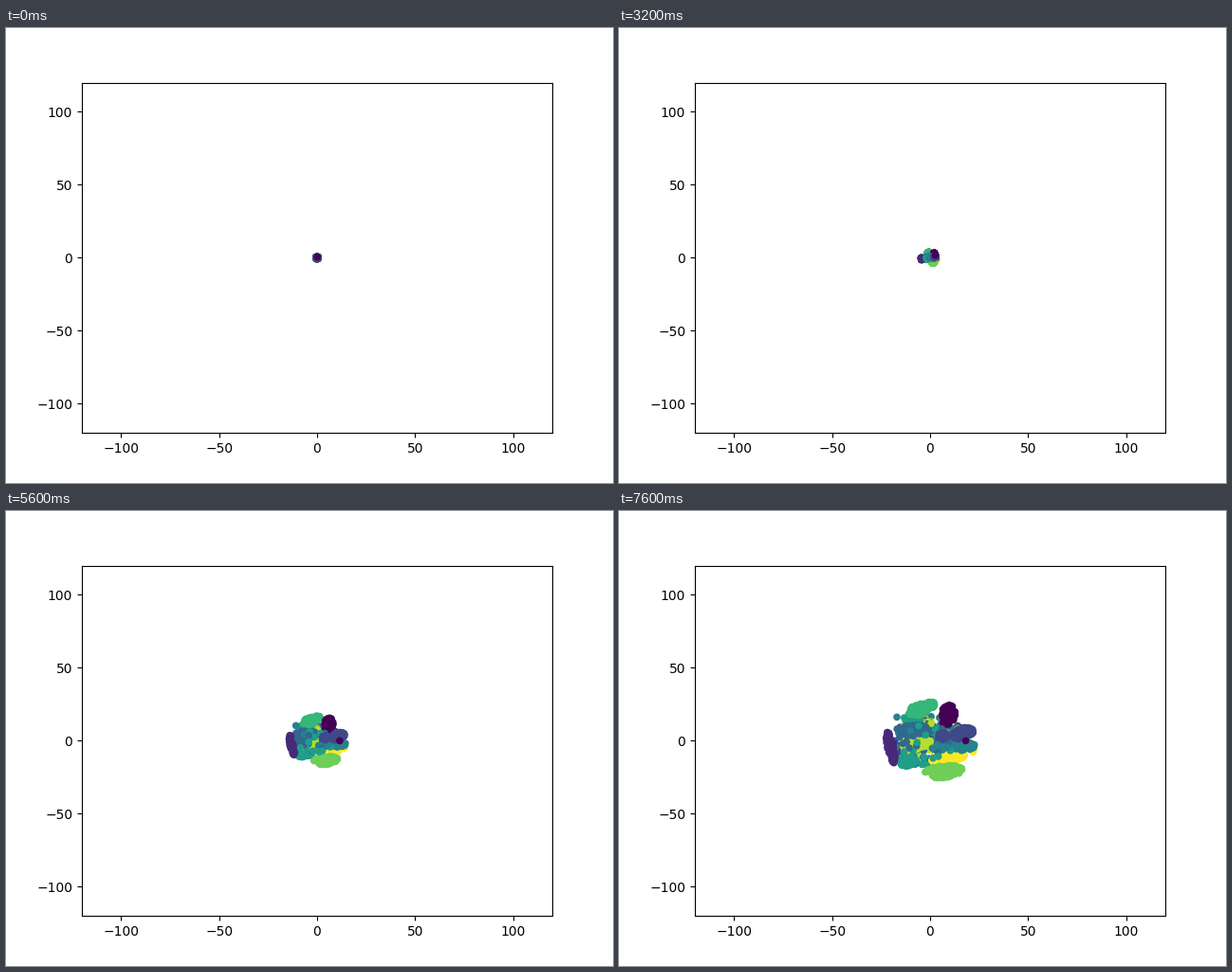
These frames come from a looping animation (640x480 px, 8000 ms). A matplotlib script:

```python
import numpy as np
import matplotlib.pyplot as plt
from matplotlib.animation import FuncAnimation

rng = np.random.default_rng(4)
FRAMES, INTERVAL = 20, 400
LIMIT = 120
UNIT = np.array([496, -369.6]) / (2 * LIMIT)  # pixels per data unit
TIGHT = np.array([0.22, 0.16])  # size of the knot, relative to the settled map

# Settled clusters in drawing order, in pixels from the centre (y down):
# label, x, y, long radius, short radius, angle
CLUSTERS = [
    (9, 18, 18, 19, 5, -6), (9, 45, 8, 5, 1, 90),
    (5, -24, 22, 9, 5, 0), (5, -19, -22, 9, 6, 0),
    (8, -14, 4, 16, 5.5, -15),
    (4, 35, 6, 13, 4.5, 0), (4, 9, 7, 7, 3, 0),
    (3, -16, -11, 16, 6, 0),
    (1, -41.5, 7, 17, 3.5, 78),
    (6, -11, -33, 12, 6, -15), (6, 1, -38, 4, 4, 0),
    (0, 19, -27, 11, 8, 105),
    (7, 14, 32.5, 20, 6.5, -6),
    (2, 34, -8, 12, 6, -12), (2, 14, -5, 6, 4, 0),
]


def disc(n):
    radius, angle = np.sqrt(rng.random(n)), rng.uniform(0, 2 * np.pi, n)
    return np.column_stack([radius * np.cos(angle), radius * np.sin(angle)])


def ellipse(n, x, y, long, short, angle=0):
    u, v = (disc(n) * (long, short)).T
    c, s = np.cos(np.radians(angle)), np.sin(np.radians(angle))
    return np.column_stack([x + c * u - s * v, y + s * u + c * v])


def build():
    points, labels = [], []

    def add(xy, label):
        points.append(xy)
        labels.append(np.broadcast_to(label, len(xy)))

    add(ellipse(220, -1, 1, 39, 27), rng.choice([2, 3, 4, 5, 8], 220))
    for label, *shape in CLUSTERS:
        if label == 2:
            continue
        add(ellipse(int(12 + 0.8 * shape[2] * shape[3]), *shape), label)
    add(ellipse(26, -4, 0, 32, 20), rng.choice([3, 4, 5], 26))
    add(np.array([(-35, -25)]), 4)
    for label, *shape in CLUSTERS[-2:]:
        add(ellipse(int(12 + 0.8 * shape[2] * shape[3]), *shape), label)
    add(np.array([(37.5, 0)]), 0)
    return np.vstack(points), np.concatenate(labels)


settled, labels = build()
means = np.array([settled[labels == k].mean(axis=0) for k in range(10)])
knot = TIGHT * means[labels] + 0.07 * (settled - means[labels])
start = disc(len(settled)) * 1.2


def position(frame):
    grow = np.sin(np.pi / 2 * min(frame / 4, 1))
    tight = start + grow * (knot - start)
    spread = max(0, (frame - 9.4) / 9.6)
    scale = 0.18 + 0.82 * spread ** 0.79
    release = min(1, 2 * np.sqrt(spread))
    return (tight + release * (scale * settled - tight)) / UNIT


fig, ax = plt.subplots(figsize=(6.4, 4.8), dpi=100)
ax.set(xlim=(-LIMIT, LIMIT), ylim=(-LIMIT, LIMIT))
ax.set_xticks(range(-100, 101, 50))
ax.set_yticks(range(-100, 101, 50))
dots = ax.scatter(*position(0).T, s=20, c=labels, cmap="viridis")


def update(frame):
    dots.set_offsets(position(frame))
    return dots,


anim = FuncAnimation(fig, update, frames=FRAMES, interval=INTERVAL,
                     repeat=True, repeat_delay=0)
plt.show()
```
